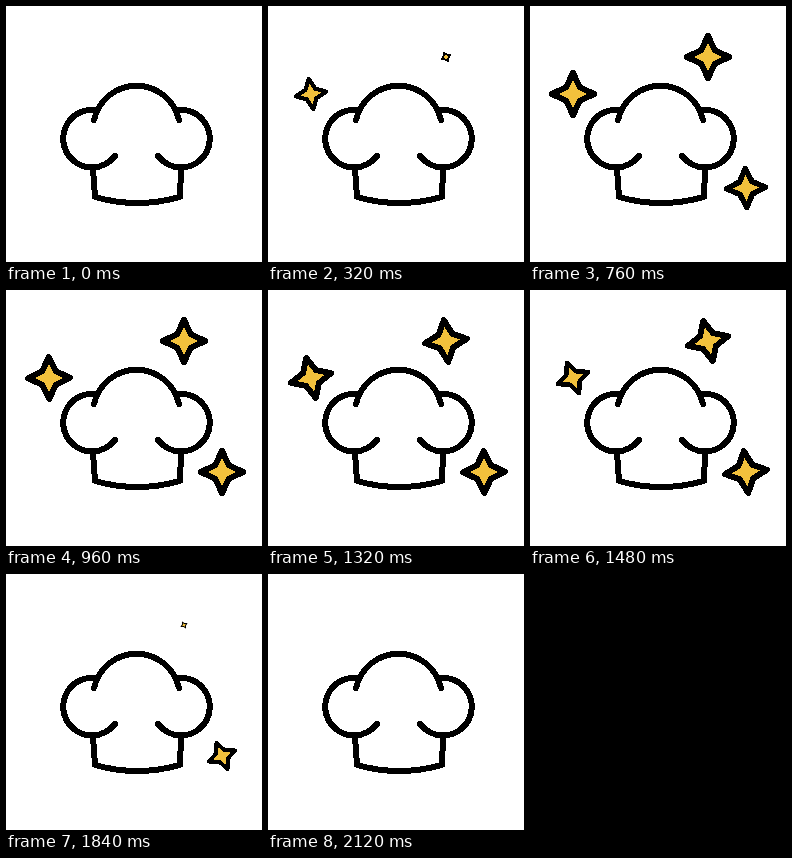
Recreate the animation shown at these times as an HTML page. Size 256x256 px, loop 6 s.

```html
<!DOCTYPE html>
<html lang="en">
<head>
<meta charset="utf-8">
<title>Chef hat with sparkles</title>
<style>
  html, body { margin: 0; width: 100%; height: 100%; overflow: hidden; background: #fff; }
  svg { display: block; width: 100vw; height: 100vh; }
</style>
</head>
<body>
<svg viewBox="0 0 256 256" fill="none" stroke="#000" stroke-width="6" stroke-linecap="round" stroke-linejoin="round" shape-rendering="crispEdges">
  <defs>
    <path id="star" fill="#f2c13c" d="M0-21 6.8-6.8 21 0 6.8 6.8 0 21-6.8 6.8-21 0-6.8-6.8Z"/>
  </defs>
  <path d="M88 114A43.5 43.5 0 0 1 173 114"/>
  <path d="M89 104A28.8 28.8 0 1 0 109 150"/>
  <path d="M172 104A28.8 28.8 0 1 1 152 150"/>
  <path d="M87 163 89 191Q131 203 174 191L175 163"/>
  <use class="star" href="#star"/>
  <use class="star" href="#star"/>
  <use class="star" href="#star"/>
</svg>
<script>
const LOOP = 6000, LIFE = 1800, GROW = 600, SHRINK = 560, STAGGER = 160, TURN = 30;
const centers = [[43, 88], [178, 51], [216, 182]];
const stars = document.querySelectorAll('.star');
const clamp = x => Math.max(0, Math.min(1, x));
const sineEase = x => (1 - Math.cos(Math.PI * x)) / 2;

// Cubic Bezier easing with handles (.333, 0) and (.4, 1)
function ease(x) {
  let lo = 0, hi = 1;
  for (let i = 0; i < 20; i++) {
    const s = (lo + hi) / 2, r = 1 - s;
    if (r * r * s + 1.2 * r * s * s + s ** 3 < x) lo = s; else hi = s;
  }
  return lo * lo * (3 - 2 * lo);
}

function draw(now) {
  const time = Math.floor((now % LOOP) / 40) * 40;
  stars.forEach((star, i) => {
    const age = time - i * STAGGER;
    const grown = ease(clamp(age / GROW));
    const scale = Math.min(grown, ease(clamp((LIFE - age) / SHRINK)));
    const leaving = sineEase(clamp(age / LIFE * 2 - 1));
    const angle = -TURN * (1 - grown + leaving);
    star.style.display = scale > 0.001 ? '' : 'none';
    star.setAttribute('transform', `translate(${centers[i]}) rotate(${angle}) scale(${scale})`);
  });
  requestAnimationFrame(draw);
}
draw(performance.now());
</script>
</body>
</html>
```
